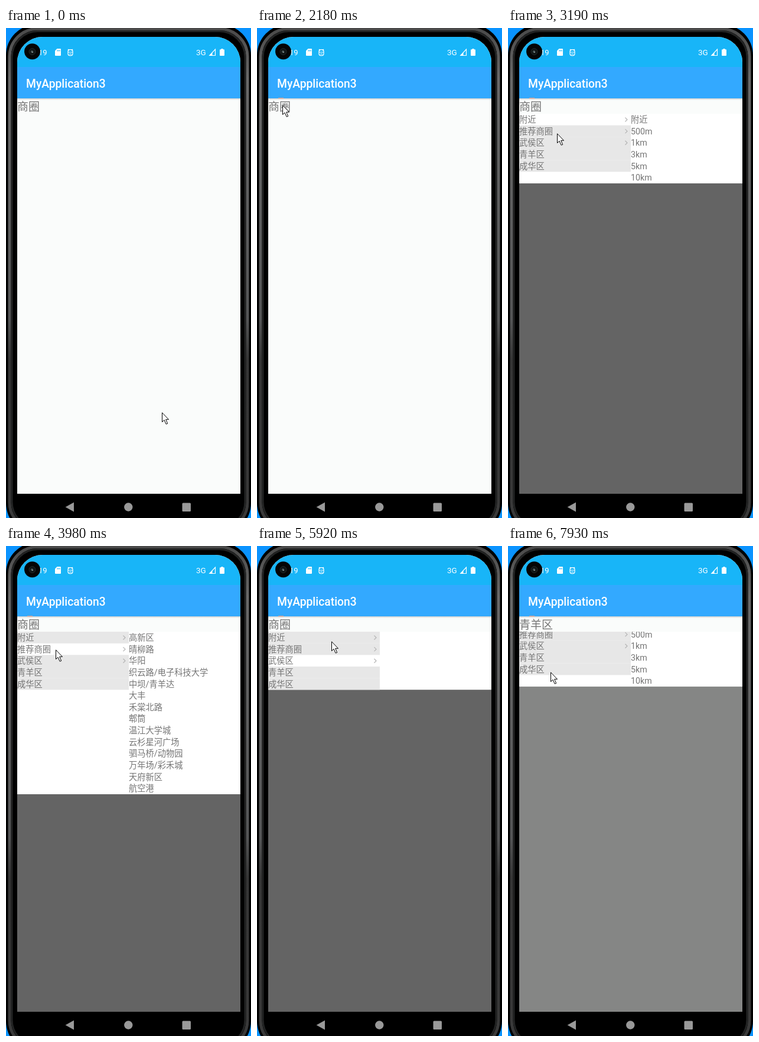
These frames come from a looping animation (415 px wide and 829 px high, 8000 ms). An HTML page:

```html
<!DOCTYPE html>
<html lang="zh-CN">
<head>
<meta charset="utf-8">
<title>Area picker</title>
<style>
  html, body { margin: 0; width: 100%; height: 100%; overflow: hidden; background: #0a93ff; }
  svg { display: block; width: 415px; height: 829px; font-family: Roboto, "Noto Sans CJK SC", "Noto Sans CJK", sans-serif; }
  .row { font-size: 14.25px; fill: #757575; }
</style>
</head>
<body>
<svg viewBox="0 0 415 829">
  <defs>
    <linearGradient id="metal" x1="0" y1="0" x2="0" y2="1">
      <stop offset="0" stop-color="#4a4a4a"/>
      <stop offset=".1" stop-color="#6a6a6a"/>
      <stop offset=".58" stop-color="#555657"/>
      <stop offset=".66" stop-color="#363636"/>
      <stop offset="1" stop-color="#3a3a3a"/>
    </linearGradient>
    <linearGradient id="shade" x1="0" y1="0" x2="0" y2="1">
      <stop offset="0" stop-color="#000" stop-opacity=".18"/>
      <stop offset="1" stop-color="#000" stop-opacity="0"/>
    </linearGradient>
    <clipPath id="screen"><path d="M19 788V58A43 43 0 0 1 62 15H354A43 43 0 0 1 397 58V788Z"/></clipPath>
    <clipPath id="below"><path d="M19 145H397V788H19Z"/></clipPath>
  </defs>

  <!-- phone body -->
  <rect y="-6" width="415" height="862" rx="52"/>
  <rect x="6" y="1.500" width="403" height="848" rx="47" fill="none" stroke="url(#metal)" stroke-width="5"/>
  <rect x="10" y="5.500" width="395" height="840" rx="44" fill="none" stroke="#222323" stroke-width="3"/>

  <!-- app screen -->
  <g clip-path="url(#screen)">
    <path fill="#fafcfb" d="M19 15H397V788H19Z"/>
    <path fill="#18b5f8" d="M19 15H397V67H19Z"/>
    <path fill="#33a9ff" d="M19 66H397V119H19Z"/>
    <path fill="url(#shade)" d="M19 119H397V122H19Z"/>
  </g>
  <text x="34" y="100.500" font-size="19.3" font-weight="500" fill="#fff">MyApplication3</text>
  <text id="title" x="19" y="140" font-size="19" fill="#757575"></text>
  <path id="mark" fill="#d99c8c" d="M36 118h9v1.3h-9z"/>

  <!-- status bar -->
  <g fill="#fff">
    <text x="55" y="46" font-size="13">19</text>
    <path d="M86.500 35H92q1 0 1 1V46q0 1-1 1H84q-1 0-1-1V38.500Z"/>
    <path fill="#18b5f8" d="M86.500 37h1v2.500h-1zM88.500 37h1v2.500h-1zM90.500 37h1v2.500h-1z"/>
    <g fill="none" stroke="#fff" stroke-width="1.2">
      <path d="M105 36L107 38M113 36L111 38"/>
      <rect x="105" y="36.600" width="8" height="10" rx="3"/>
      <path d="M105 41H113M107 44H111"/>
      <path d="M354.500 36V46.500H344.800Z"/>
    </g>
    <path d="M349.500 41V46.500H344.800Z"/>
    <text x="322" y="46" font-size="13.500">3G</text>
    <path d="M364.500 35h3v1.200H369q1 0 1 1V46q0 1-1 1h-6q-1 0-1-1V37.200q0-1 1-1h1.500z"/>
  </g>
  <circle cx="44.500" cy="39.700" r="13.500" fill="#050505"/>
  <circle cx="44.500" cy="40" r="5.500" fill="#101515" stroke="#222929"/>
  <circle cx="44" cy="40" r="2" fill="#4a5656"/>
  <circle cx="45" cy="41" r=".9" fill="#9aa5a5"/>

  <!-- navigation bar -->
  <g fill="#999">
    <path d="M100.700 810.500L115 802.500V818.500Z"/>
    <circle cx="207.300" cy="810.500" r="7.200"/>
    <rect x="298.500" y="803.500" width="14.500" height="14.500" rx="1.500"/>
  </g>

  <g clip-path="url(#below)">
    <path id="dim" d="M19 145H397V788H19Z"/>
    <g id="popup"></g>
  </g>

  <circle id="click" r="12" fill="#ff4500" fill-opacity=".47"/>
  <path id="cursor" fill="#fff" stroke="#000" d="M.5.800V16.500L4 13.200L7.200 20.200L9.700 19.200L6.700 12.300H11.500Z"/>
</svg>
<script>
const $ = id => document.getElementById(id);
const LOOP = 8000, ROW = 19.64;
const areas = ['附近', '推荐商圈', '武侯区', '青羊区', '成华区'];
const choices = [
  ['附近', '500m', '1km', '3km', '5km', '10km'],
  ['高新区', '晴柳路', '华阳', '织云路/电子科技大学', '中坝/青羊达', '大丰', '禾棠北路', '郫筒', '温江大学城',
    '云杉星河广场', '驷马桥/动物园', '万年场/彩禾城', '天府新区', '航空港'],
  []
];
// [first step, last step, number of steps, x, y]
const moves = [
  [70, 70, 1, 228, 616], [250, 310, 2, 141, 500], [510, 1170, 11, 41, 131],
  [1370, 1370, 1, 41, 130], [2040, 2040, 1, 42, 130], [2180, 2180, 1, 43, 130],
  [2500, 2980, 8, 74, 174], [3050, 3190, 3, 83, 178], [3500, 3570, 2, 84, 175],
  [4180, 4530, 6, 97, 193], [5450, 5850, 6, 128, 165], [5920, 6120, 3, 123, 154],
  [6770, 7040, 5, 83, 203], [7110, 7390, 5, 72, 213]
];
const clicks = [[1440, 1580], [3600, 3710], [4860, 4990], [6180, 6310], [7790, 7860]];

const rect = (x, y, w, h, fill) => `<rect x="${x}" y="${y}" width="${w}" height="${h}" fill="${fill}"/>`;
const label = (s, x, i) => `<text class="row" x="${x}" y="${160 + i * ROW}">${s}</text>`;

function panel(sel) {
  const list = choices[sel], rows = Math.max(areas.length, list.length);
  const left = areas.map((s, i) => {
    const y = 145 + i * ROW;
    return (i === sel ? '' : rect(19, y, 189, ROW + .1, '#e7e7e7')) + label(s, 19, i) +
      (i < 3 ? `<path d="M198.500 ${y + 6.5}l3.500 3.500l-3.500 3.500" fill="none" stroke="#b4b4b4" stroke-width="1.2"/>` : '');
  });
  return rect(19, 145, 378, rows * ROW, '#fff') + left.join('') + list.map((s, i) => label(s, 208, i)).join('');
}

// cubic-bezier(.4, 0, .2, 1)
function ease(x) {
  if (x <= 0) return 0;
  if (x >= 1) return 1;
  let lo = 0, hi = 1, s;
  for (let i = 0; i < 20; i++) {
    s = (lo + hi) / 2;
    if (1.2 * (1 - s) ** 2 * s + .6 * (1 - s) * s * s + s ** 3 < x) lo = s; else hi = s;
  }
  return s * s * (3 - 2 * s);
}

function pointer(t) {
  let x = 264, y = 650;
  for (const [from, to, n, nx, ny] of moves) {
    if (t < from) break;
    const gap = (to - from) / (n - 1) || 1;
    const k = Math.min(n, Math.floor((t - from) / gap + 1e-6) + 1) / n;
    x += (nx - x) * k;
    y += (ny - y) * k;
  }
  return `translate(${Math.round(x)} ${Math.round(y)})`;
}

let shown = -1;
function draw(t) {
  const sel = t < 3980 ? 0 : t < 5120 ? 1 : t < 6440 ? 2 : 0;
  if (sel !== shown) $('popup').innerHTML = panel(shown = sel);

  // the popup advances in 70 ms steps
  const held = 2260 + Math.floor((t - 2260) / 70) * 70;
  const open = ease((held - 2203) / 300) - ease((held - 7858) / 300);
  const height = Math.max(areas.length, choices[sel].length) * ROW;
  $('popup').setAttribute('transform', `translate(0 ${Math.round((open - 1) * height)})`);
  $('popup').style.display = open > 0 ? '' : 'none';
  $('dim').style.opacity = .6 * open;

  $('title').textContent = t < 7860 ? '商圈' : '青羊区';
  $('mark').style.display = t < 1580 ? 'none' : '';
  const at = pointer(t);
  $('cursor').setAttribute('transform', at);
  $('click').setAttribute('transform', at);
  $('click').style.display = clicks.some(([a, b]) => t >= a && t < b) ? '' : 'none';
}

const start = performance.now();
function tick() {
  draw((performance.now() - start) % LOOP);
  requestAnimationFrame(tick);
}
tick();
</script>
</body>
</html>
```
